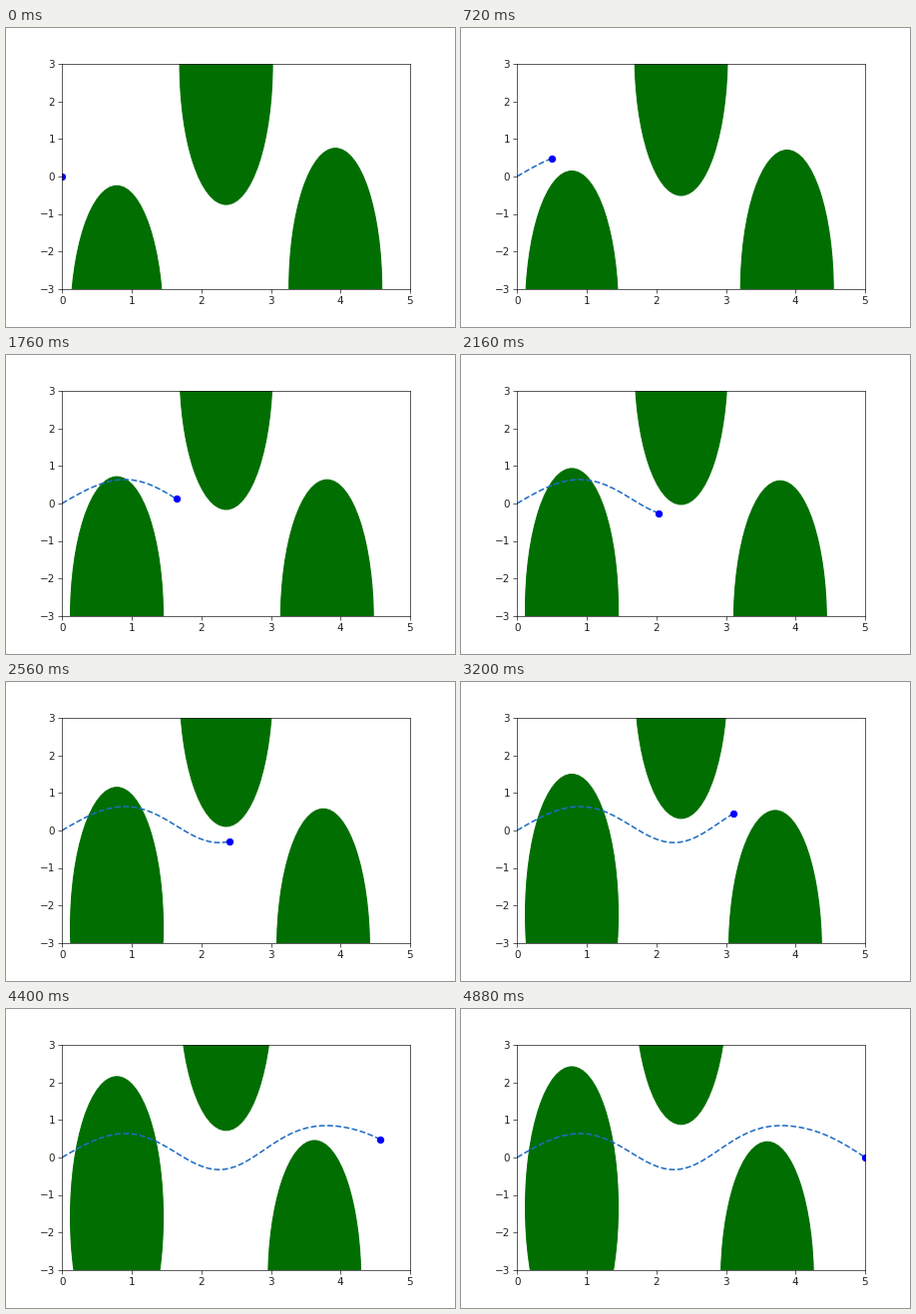
A matplotlib script that plays this animation: 450 px wide and 300 px high, repeating every 4960 ms.

```python
import numpy as np
import matplotlib.pyplot as plt
from matplotlib.animation import FuncAnimation
from matplotlib.patches import Ellipse

FRAMES = 62
LAST = FRAMES - 1
GREEN = "#006e00"
DASH_BLUE = "#1f6cc4"
INK = "#222222"


def sine_sum(s, *weights):
    """Sum of sines that vanish at s = 0 and s = 1."""
    return sum(w * np.sin(k * np.pi * s) for k, w in enumerate(weights, 1))


# The ball drifts across with a wobble in speed, along a wavy path
t = np.linspace(0, 1, FRAMES)
xs = 5 * t + sine_sum(t, -0.196, -0.09, 0, -0.083, -0.007)
ys = sine_sum(xs / 5, 0.374, -0.205, 0.543, 0.13, -0.054, -0.036, 0.013)

plt.rcParams.update({
    "axes.linewidth": 0.6, "xtick.major.width": 0.6, "ytick.major.width": 0.6,
    "xtick.labelcolor": INK, "ytick.labelcolor": INK,
})
fig, ax = plt.subplots(figsize=(6, 4), dpi=75)
fig.subplots_adjust(left=0.125, right=0.9, bottom=0.1275, top=0.88)
ax.set(xlim=(0, 5), ylim=(-3, 3), xticks=range(6), yticks=range(-3, 4))

# Start centre and total drift of each obstacle
obstacles = [
    ((np.pi / 4, -4), (0, 8 / 3)),
    ((3 * np.pi / 4, 3), (0, 1.63)),
    ((5 * np.pi / 4, -3), (-1 / 3, -1 / 3)),
]
blobs = [ax.add_patch(Ellipse(start, 4 / 3, 7.5, color=GREEN, linewidth=1))
         for start, _ in obstacles]
trail, = ax.plot([], [], "--", color=DASH_BLUE, linewidth=1.5)
ball, = ax.plot([], [], "o", color="blue", markersize=6)


def update(i):
    p = i / LAST
    for blob, ((x, y), (dx, dy)) in zip(blobs, obstacles):
        blob.set_center((x + dx * p, y + dy * p))
    trail.set_data(xs[:i + 1], ys[:i + 1])
    ball.set_data([xs[i]], [ys[i]])
    return [*blobs, trail, ball]


anim = FuncAnimation(fig, update, frames=FRAMES, interval=80, repeat=True,
                     repeat_delay=0)
plt.show()
```
